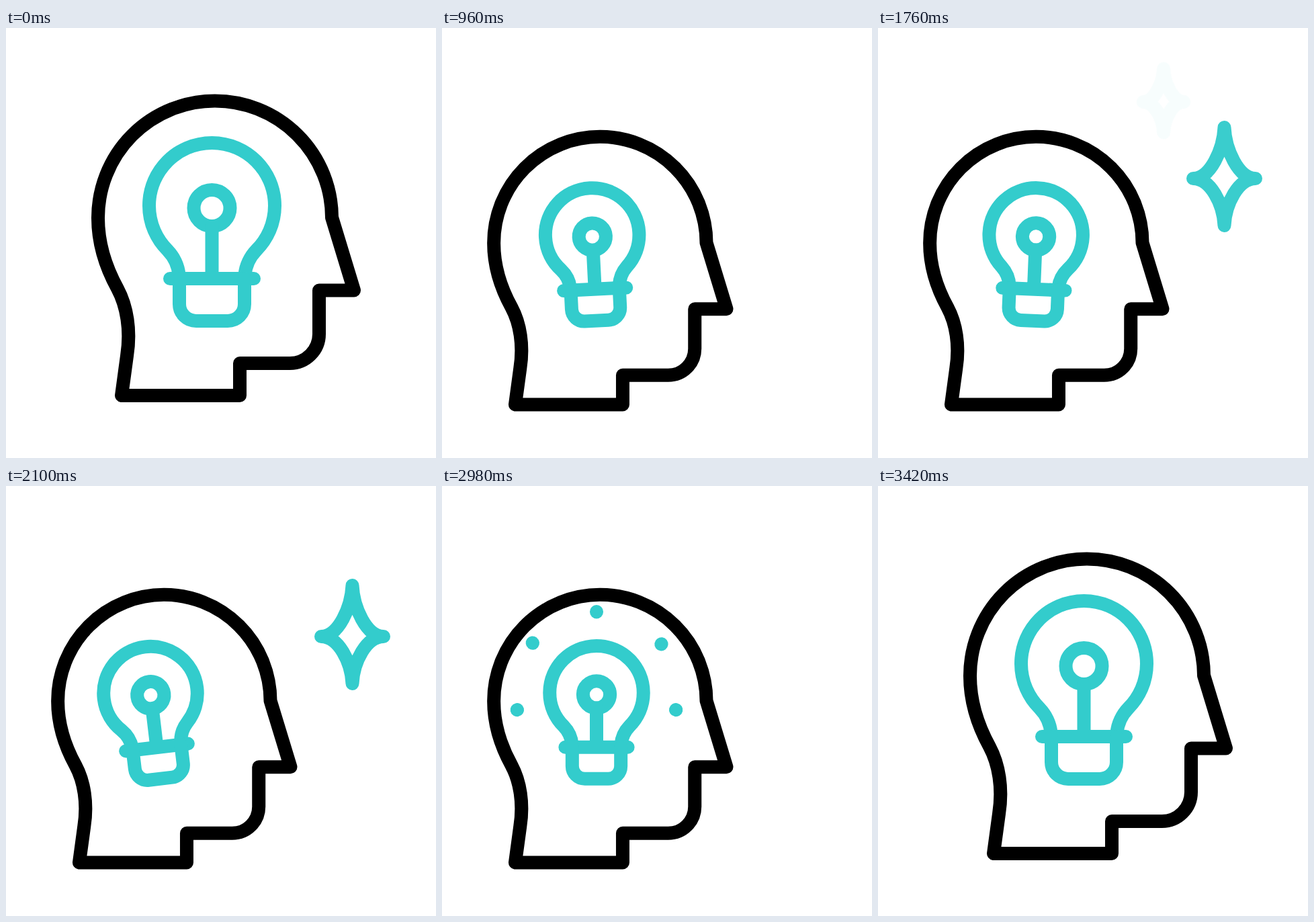
Write an HTML page that moves like this. It is 640x640 px and loops after 3.6 s.

```html
<!DOCTYPE html>
<html lang="en">
<head>
<meta charset="utf-8">
<title>Bright idea</title>
<style>
  @property --p { syntax: "<number>"; inherits: true; initial-value: 0; }
  @property --tilt { syntax: "<angle>"; inherits: true; initial-value: 0deg; }

  html, body { margin: 0; width: 100%; height: 100%; overflow: hidden; background: #fff; }

  svg {
    display: block;
    width: 640px;
    height: 640px;
    fill: none;
    stroke: #33cccc;
    stroke-width: 20px;
    stroke-linecap: round;
    stroke-linejoin: round;
  }

  svg, .star, .rays { animation: 3600ms cubic-bezier(.3333, 0, .6667, 1) infinite; }

  /* --p: 0 = large pose, 1 = small pose */
  svg { animation-name: shrink, swing; }

  /* Line weight stays constant while shapes scale */
  .head, .bulb { stroke-width: calc(20px / var(--s)); }

  .head {
    --s: calc(1 - var(--p) / 11);
    stroke: #000;
    transform: translate(calc(-47.4px * var(--p)), calc(63.2px * var(--p))) scale(var(--s));
  }

  .bulb {
    --s: calc(1 - .254 * var(--p));
    transform: translate(calc(306.5px - 76.5px * var(--p)), calc(436px - .3px * var(--p)))
               rotate(var(--tilt)) scale(var(--s));
  }

  .star { opacity: 0; }
  .big { animation-name: twinkle-big; }
  .small { animation-name: twinkle-small; stroke-width: 30.77px; }

  .rays { stroke-dasharray: 0 60; stroke-opacity: 0; animation-name: shoot, show; }

  @keyframes shrink {
    0%, 5.5556% { --p: 0; }
    22.2222%, 83.3333% { --p: 1; }
    94.4444%, 100% { --p: 0; }
  }

  @keyframes swing {
    0%, 22.2222% { --tilt: 0deg; }
    33.3333% { --tilt: -8deg; }
    44.4444% { --tilt: 8deg; }
    55.5556% { --tilt: -8deg; }
    66.6667%, 100% { --tilt: 0deg; }
  }

  @keyframes twinkle-big {
    0%, 36.1111%, 45%, 53.8889%, 62.7778%, 100% { opacity: 0; }
    40.5556%, 49.4444%, 58.3333% { opacity: 1; }
  }

  @keyframes twinkle-small {
    0%, 40.5556%, 49.4444%, 58.3333%, 100% { opacity: 0; }
    45%, 53.8889% { opacity: 1; }
  }

  @keyframes shoot {
    0%, 72.2222% { stroke-dasharray: 0 60; stroke-dashoffset: 0; }
    77.7778% { stroke-dasharray: 18 60; stroke-dashoffset: 0; }
    83.3333%, 100% { stroke-dasharray: 0 60; stroke-dashoffset: -18; }
  }

  @keyframes show {
    0%, 72.4% { stroke-opacity: 0; }
    72.41%, 83.2% { stroke-opacity: 1; }
    83.21%, 100% { stroke-opacity: 0; }
  }
</style>
</head>
<body>
<svg viewBox="0 0 640 640">
  <defs>
    <path id="star" d="M0-76C1.5-44 20.5 0 46.5 0C20.5 0 1.5 38 0 70C-1.5 38-20.5 0-46.5 0C-20.5 0-1.5-44 0-76Z"/>
    <path id="ray" d="M103 0h19"/>
  </defs>

  <path class="head" d="M172 547H348V499H422.5A43.5 43.5 0 0 0 466 455.5V390.5H518L485 282
    A174 174 0 0 0 137 283C137 320 149 357 166 388C180 414 186 450 180 488Z"/>

  <g class="bulb">
    <path d="M-49-68C-50-82-57-96-66.1-105.4A93.5 93.5 0 1 1 66.1-105.4C57-96 50-82 49-68"/>
    <circle cy="-168" r="27"/>
    <path d="M0-141V-63M-62.5-63H62.5"/>
    <path d="M-48.5-63v38a25 25 0 0 0 25 25h47a25 25 0 0 0 25-25v-38"/>
  </g>

  <g class="rays" transform="translate(230 308)">
    <use href="#ray" transform="rotate(168)"/>
    <use href="#ray" transform="rotate(218)"/>
    <use href="#ray" transform="rotate(270)"/>
    <use href="#ray" transform="rotate(323)"/>
    <use href="#ray" transform="rotate(12)"/>
  </g>

  <g class="star big"><use href="#star" transform="translate(515.5 224)"/></g>
  <g class="star small"><use href="#star" transform="translate(425 110) scale(.65)"/></g>
</svg>
</body>
</html>
```
